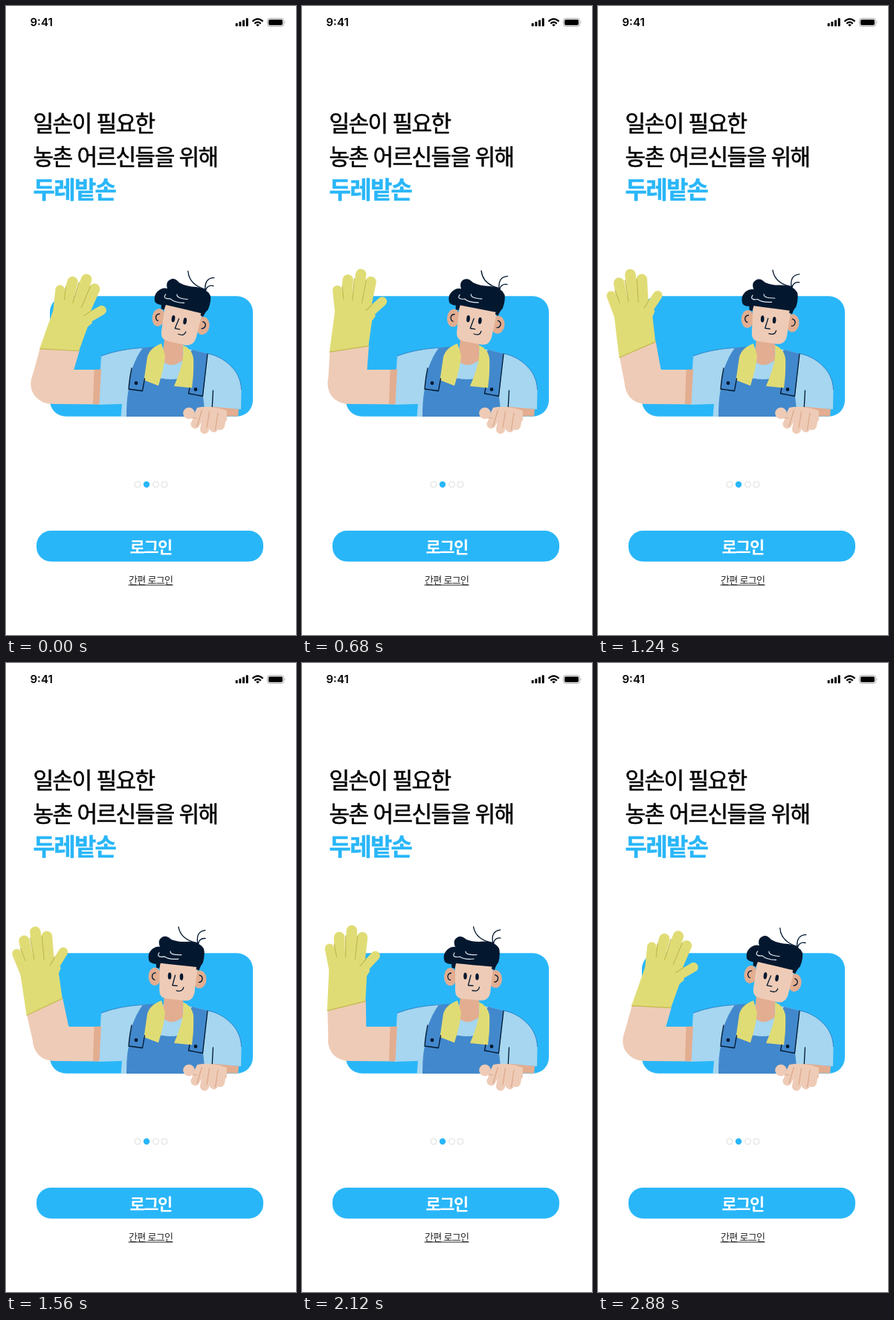
Recreate the animation shown at these times as an HTML page. Size 390 by 844 pixels, loop 2.92 s.

```html
<!DOCTYPE html>
<html lang="ko">
<head>
<meta charset="utf-8">
<style>
  html, body { margin: 0; width: 100%; height: 100%; overflow: hidden; background: #fff; }
  svg { display: block; width: 390px; height: 844px; }
  text { font-family: "Noto Sans CJK KR", "Noto Sans CJK", sans-serif; }
  .clock { font: 600 15px Inter, sans-serif; }
  .title { font-size: 30px; font-weight: 500; letter-spacing: -1.55px; stroke: #000; stroke-width: .5; }
  .name { font-size: 32px; font-weight: 700; letter-spacing: -1.75px; stroke: #29b6f8; stroke-width: .4; }
  .login { font-size: 22px; font-weight: 700; letter-spacing: -1.5px; }
  .quick { font-size: 13px; letter-spacing: -.72px; }
  .blue { fill: #29b6f8; }
  .skin { fill: #eecbb6; }
  .shade { fill: #e2ad90; }
  .shirt { fill: #a6d6f0; }
  .denim { fill: #4288cc; }
  .yellow { fill: #e0dc75; }
  .hair { fill: #03182f; }
  .ink, .crease { fill: none; stroke: #03182f; stroke-width: 1.3; stroke-linecap: round; stroke-linejoin: round; }
  .crease { stroke: #c3b950; stroke-width: 1.2; }
  .finger { fill: none; stroke: #e0dc75; stroke-linecap: round; }
  .knuckle { fill: none; stroke: #eecbb6; stroke-width: 12; stroke-linecap: round; }
  .gap { fill: none; stroke: #d9a588; stroke-width: 1.1; stroke-linecap: round; }
  .curl { fill: none; stroke: #dfe9f0; stroke-width: 1.2; stroke-linecap: round; }
  .dot { fill: #fff; stroke: #dedede; }
</style>
</head>
<body>
<svg viewBox="0 0 390 844">
  <g id="status">
    <text class="clock" x="32.5" y="27">9:41</text>
    <rect x="308.7" y="23" width="3" height="4.3" rx=".8"/>
    <rect x="313.4" y="21" width="3" height="6.3" rx=".8"/>
    <rect x="318" y="18.7" width="3" height="8.6" rx=".8"/>
    <rect x="322.7" y="16.3" width="3" height="11" rx=".8"/>
    <g fill="none" stroke="#000" stroke-width="2.2">
      <path d="M331.5 20.8Q338.5 14 345.5 20.8"/>
      <path d="M334.3 23.6Q338.5 19.7 342.7 23.6"/>
    </g>
    <path d="M336.2 25.2Q338.5 23.4 340.8 25.2L338.5 27.6Z"/>
    <rect x="351.5" y="16.7" width="22" height="10.6" rx="3" fill="none" stroke="#a5a5a5"/>
    <rect x="353" y="18.3" width="19" height="7.4" rx="1.7"/>
    <path d="M374.8 20.2Q376.5 22 374.8 23.8Z" fill="#a5a5a5"/>
  </g>

  <text class="title" x="36.5" y="167.500">일손이 필요한</text>
  <text class="title" x="36.5" y="212.500">농촌 어르신들을 위해</text>
  <text class="name blue" x="36.5" y="258">두레밭손</text>

  <rect class="blue" x="59" y="389.3" width="273" height="161.4" rx="21.5"/>

  <g id="body">
    <path class="shirt" d="M128 470Q158 458 200 458L250 461L271 466.5C285 468 316 484 316.5 515L316 541L277 540L268 551H154.500L156 534L124 535Z"/>
    <path d="M128 469.5Q152 460.5 184 458.5M271 466.5C285 468 316 484 316.5 515" fill="none" stroke="#2d7fc4" stroke-width=".9"/>
    <path class="shade" d="M277 537.5L313 541L312 550.5H277Z"/>
    <path class="denim" d="M184 458.5L200 457L206 499Q220 502 231 500L250 461L271 466.5L265 523L268 551H162Q162 527 165 514Q166 484 184 458.5Z"/>
    <path class="shade" d="M213 447H238V477Q231 485 222 485Q214 483 210 474Z"/>
    <path class="shirt" d="M211 476Q222 488 238 475L231 500Q219 502 206 499Z"/>
    <path class="yellow" d="M209 453Q193 459 190 471L185.5 502L205 509.500Q213 484 214 469Z"/>
    <path class="yellow" d="M238 455Q250 460 252 472Q253 493 250 512.5L226 510Q237 485 238.5 468Z"/>
    <path class="ink" d="M169 486Q166 500 165 514L183.5 516.5L186.5 500M271 467L264.5 523.5L245.5 520L247 512.5M278.5 516L277 543"/>
    <circle class="hair" cx="175" cy="506" r="2.4"/>
    <circle class="hair" cx="255" cy="514.5" r="2.4"/>
  </g>

  <g id="hand">
    <path class="skin" d="M257 539Q275 535 297 543V556L285 564L250 554Z"/>
    <circle class="skin" cx="246" cy="546.5" r="7.8"/>
    <path class="knuckle" d="M263 545L254.5 561M271 548L267 568M282 548L279.5 566M291 548L288 563"/>
    <path class="gap" d="M252 552L256 553M263.5 542L257 564M273.5 544L270 566M285 546L281.5 569"/>
  </g>

  <path class="skin" d="M62 488H127L125 534.5L62 534Z"/>
  <path class="shade" d="M118.5 488L128 487.5L125.5 534.5L117 534Z"/>

  <g id="arm">
    <path class="skin" d="M33 467L84 452L86 490Q92 510 63 534Q36 532 35.5 505Z"/>
    <circle class="skin" cx="63" cy="506" r="27.8"/>
    <path class="yellow" d="M32.5 468L33 405L44 388L76 386L82 400L88 412L84 419L83.5 453Z"/>
    <path class="finger" stroke-width="12.5" d="M41 420L32.5 384M76 413L94.5 391.5"/>
    <path class="finger" stroke-width="14.5" d="M47 402L45 368.5M61 402L61.5 359M73 405L76 367.5"/>
    <path class="crease" d="M38.5 378L42.5 395M53.5 366L54.5 395M69.5 366L67.5 397M82 396Q77 404 74 406M33 467.5L83.5 453"/>
  </g>

  <g id="head">
    <ellipse class="shade" cx="199.5" cy="421" rx="8.5" ry="12"/>
    <ellipse class="shade" cx="260" cy="424" rx="9" ry="12"/>
    <path class="skin" d="M206 400L257.5 404L253.5 440Q252 453.5 240 452.8L215 450.5Q206 449.500 206 439Z"/>
    <path class="hair" d="M192 401Q188 391 196 384Q201 380 206 381Q202 372 209 368Q214 365 221 371Q231 375 245 373.5Q260 374 265 383Q267 391 264 402Q261 405 259 412L255 410.500L255.500 407.500Q228 405 207 403L205.5 410L201.5 409L201 404Q195 404 192 401Z"/>
    <path class="curl" d="M205 389C201 395 208 395 212 394C216 397 222 398 231 397M220 387C220 391 226 392 235 391.500"/>
    <path class="ink" stroke-width="1.1" d="M230.5 354Q234 372 258 375.5M266.500 358Q253 360 257 377M267 369Q258 368 257 379"/>
    <ellipse class="hair" cx="219.5" cy="420" rx="2.3" ry="4.6"/>
    <ellipse class="hair" cx="235.5" cy="421" rx="2.3" ry="4.6"/>
    <path class="ink" d="M227 419L223.5 432.5L230 433M229 439.500Q237.500 441.500 238.500 435M200.500 416Q196 416.500 196 421Q196.500 425 199.500 425.500M259.500 418.500Q264 419.500 263.500 424Q262.500 428 259 428"/>
  </g>

  <circle class="dot" cx="177" cy="642" r="4"/>
  <circle class="blue" cx="189" cy="642" r="4.2"/>
  <circle class="dot" cx="201.5" cy="642" r="4"/>
  <circle class="dot" cx="213" cy="642" r="4"/>

  <rect class="blue" x="41" y="704" width="305" height="41.5" rx="19.5"/>
  <text class="login" x="166.6" y="733.5" fill="#fff">로그인</text>
  <text class="quick" x="165" y="775" fill="#222">간편 로그인</text>
  <rect x="164.5" y="776.5" width="60" height="1" fill="#222"/>
</svg>
<script>
  const LOOP = 2920, STEP = 40, HEAD_TURN = 2020;
  const arm = document.getElementById('arm');
  const head = document.getElementById('head');
  const ease = u => (1 - Math.cos(Math.PI * u)) / 2;
  const rotate = (el, angle, x, y) =>
    el.setAttribute('transform', `rotate(${angle.toFixed(3)} ${x} ${y})`);

  function draw(ms) {
    const t = Math.floor((ms % LOOP) / STEP) * STEP;
    rotate(arm, 5 + 14.2 * Math.cos(2 * Math.PI * (t - 22) / LOOP), 62, 501);

    // The head leans away slowly and comes back quickly.
    const lean = t < HEAD_TURN
      ? ease(t / HEAD_TURN)
      : 1 - ease((t - HEAD_TURN) / (LOOP - HEAD_TURN));
    rotate(head, 7.8 - 8 * lean, 225, 460);
  }

  const start = performance.now();
  function tick() {
    draw(performance.now() - start);
    requestAnimationFrame(tick);
  }
  tick();
</script>
</body>
</html>
```
